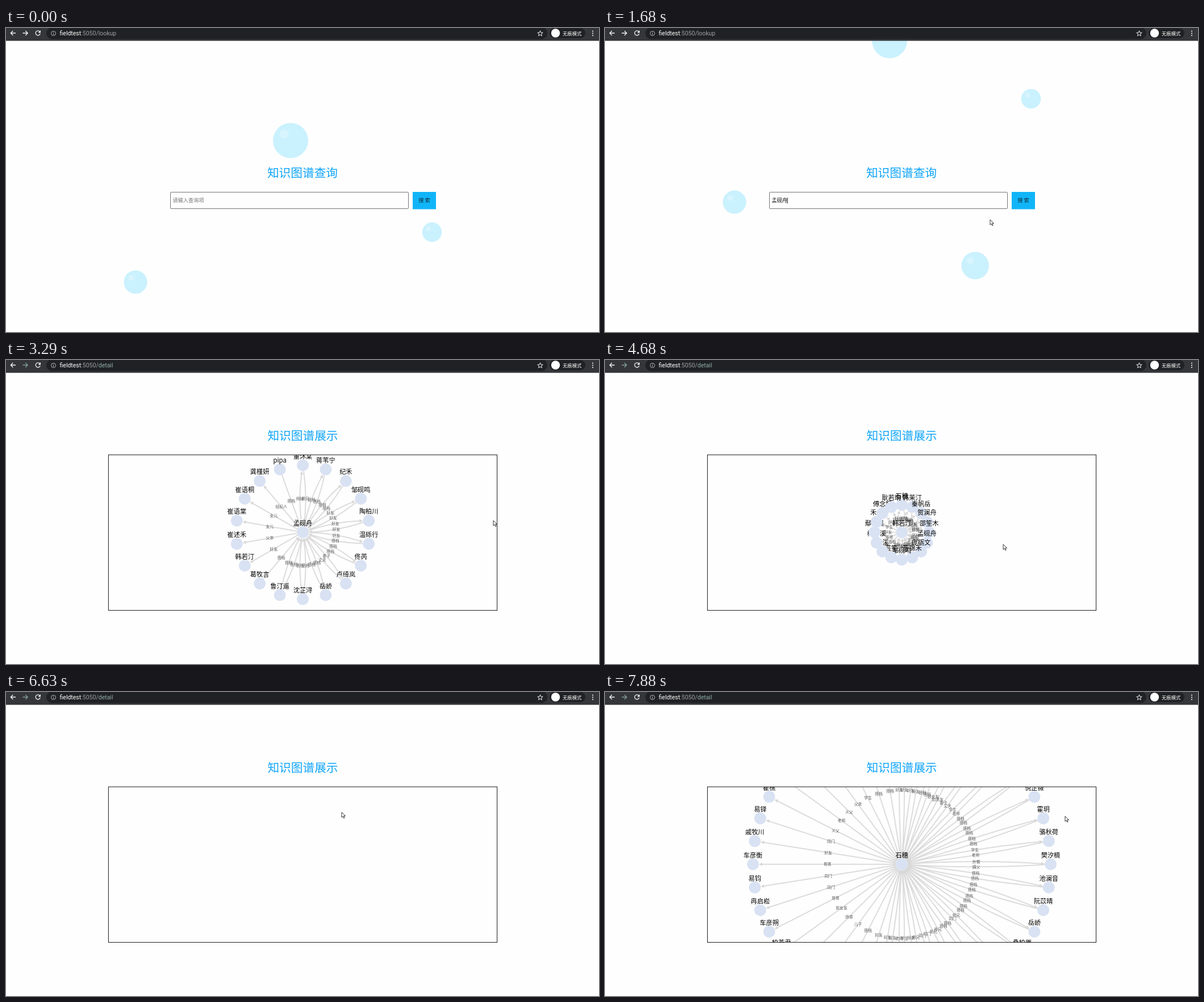
An HTML page that plays this animation: 1044x536 px, repeating every 8000 ms.

```html
<!DOCTYPE html>
<html lang="zh-CN">
<head>
<meta charset="utf-8">
<title>知识图谱</title>
<style>
  html, body { margin: 0; width: 100%; height: 100%; overflow: hidden; background: #fefefe; }
  svg { display: block; width: 1044px; height: 536px; font-family: "Noto Sans CJK SC", "Noto Sans CJK", sans-serif; }
  .title { font-size: 20.7px; font-weight: 350; fill: #10a5fa; text-anchor: middle; }
  .field { font-size: 9.2px; }
  .name { font-size: 11.2px; text-anchor: middle; }
  .relation { font-size: 6.8px; fill: #555; text-anchor: middle; }
  .url { font: 10.5px Roboto, sans-serif; }
  .icon { fill: none; stroke: #f1f3f4; stroke-width: 1.3; }
</style>
</head>
<body>
<svg viewBox="0 0 1044 536">
  <defs><clipPath id="frame"><rect x="181" y="167.5" width="683" height="273.5"/></clipPath></defs>

  <g id="searchPage">
    <g id="bubbles"></g>
    <text class="title" x="522" y="263">知识图谱查询</text>
    <rect x="289.5" y="289.5" width="419" height="29" rx="1.5" fill="#fefefe" stroke="#767676"/>
    <text id="query" class="field" x="293.5" y="307.2"></text>
    <rect id="caret" x="320.5" y="299" width="1" height="10.5"/>
    <rect x="716" y="289" width="41" height="30.5" fill="#10b5f8"/>
    <text class="field" x="736.5" y="307.4" text-anchor="middle" fill="#102a38">搜 索</text>
  </g>

  <g id="resultPage">
    <text class="title" x="522.5" y="141">知识图谱展示</text>
    <g id="graphs" clip-path="url(#frame)"></g>
    <rect x="180.4" y="167.2" width="684.2" height="274.2" fill="none" stroke="#1a1a1a"/>
  </g>

  <g id="toolbar">
    <rect width="1044" height="22.6" fill="#35363a"/>
    <rect x="71" y="-1" width="882" height="20.5" rx="10" fill="#202124"/>
    <rect x="957" y="0" width="63" height="18" rx="9" fill="#202124"/>
    <path class="icon" d="M17 9H8.5M12.3 5L8.3 9L12.3 13"/>
    <path class="icon" id="forward" d="M29.5 9H38M34.2 5L38.2 9L34.2 13"/>
    <path class="icon" d="M59.4 6.2A4.1 4.1 0 1 0 60.2 10.2"/>
    <path d="M61 4V8.4H56.6Z" fill="#f1f3f4"/>
    <circle class="icon" cx="83.5" cy="9.5" r="4" style="stroke:#b4b8bc;stroke-width:1"/>
    <path d="M83.5 7V8M83.5 9V12" stroke="#b4b8bc"/>
    <text class="url" x="94.5" y="13"><tspan fill="#fff">fieldtest</tspan><tspan fill="#9aa0a6">:5050/</tspan><tspan id="route"></tspan></text>
    <path class="icon" id="star" style="stroke-width:1"/>
    <circle cx="967.5" cy="9" r="7.7" fill="#fff"/>
    <text x="980" y="12.6" font-size="8.4" fill="#fff">无痕模式</text>
    <g fill="#f1f3f4">
      <circle cx="1033" cy="5.5" r="1.1"/><circle cx="1033" cy="9.3" r="1.1"/><circle cx="1033" cy="13.1" r="1.1"/>
    </g>
  </g>

  <path id="cursor" d="M0 0V9.1L2.1 7.2L3.6 10.5L5.1 9.8L3.7 6.6H6.5Z" fill="#fff" stroke="#222" stroke-width=".9"/>
</svg>

<script>
const LOOP = 8000, RESULT_AT = 2100, TYPED_AT = 900;
const CX = 522.5, CY = 303.7, NODE_R = 10.5, GROW = 620, BEND = 8.3;

const $ = id => document.getElementById(id);
const show = (node, on) => node.setAttribute('display', on ? 'inline' : 'none');
const set = (node, attrs) => { for (const k in attrs) node.setAttribute(k, attrs[k]); };

function el(parent, tag, attrs, text) {
  const node = document.createElementNS('http://www.w3.org/2000/svg', tag);
  set(node, attrs);
  if (text) node.textContent = text;
  return parent.appendChild(node);
}

// x, y at time 0, radius, rise in px per ms
const bubbles = [
  [501, 198.5, 31, .1048], [750, 360, 17.3, .1399], [228, 448, 20.6, .0839], [651.7, 620.6, 24.2, .12]
].map(([x, y, r, speed]) => {
  const group = el($('bubbles'), 'g', {});
  el(group, 'circle', { r, fill: '#caf1fe' });
  el(group, 'circle', { cx: -r * .36, cy: -r * .36, r: r * .26, fill: '#d8f4fe' });
  return t => set(group, { transform: `translate(${x} ${y - speed * t})` });
});

// Nodes run clockwise from the top: "name:outgoing/second"; "<" marks an edge towards the centre.
const GRAPHS = [
  { start: 2450, end: 4210, radius: 118, centre: '孟砚舟', nodes:
    '董沐棠:师妹/<师兄 蒋苇宁:搭档/<搭档 纪禾:搭档/<搭档 邹砚鸣:好友/<好友 陶柏川:好友/<好友 温砾行:好友/<搭档 ' +
    '佟芮:搭档/<搭档 卢绮岚:妻子/<丈夫 岳峤:<搭档/<搭档 沈芷浔:<搭档/<搭档 鲁汀遥:<搭档/<搭档 葛牧言:<搭档 ' +
    '韩若汀:好友 崔述禾:父亲 崔语棠:女儿 崔语桐:女儿 龚槿妍:经纪人 pipa:<搭档' },
  { start: 4400, end: 6160, radius: 106, centre: '韩若汀', nodes:
    '石穗:好友/<好友 韩茉汀:姐姐/<妹妹 秦帆岳:搭档/<搭档 贺澜舟:好友/<好友 邵笙木:搭档/<搭档 孟砚舟:<好友 ' +
    '庞砺文:前男友/<前女友 苗锦禾:母亲/<女儿 邹砚鸣:搭档/<搭档 芸笙:<主演 乔溪:搭档 柯亦溪:哥哥 鄢柏昊:好友 ' +
    '禾雀:学生 傅念桐:好友 耿若璃:好友' },
  { start: 6790, end: LOOP, radius: 262, centre: '石穗', nodes:
    '韩若汀:好友/<好友 邹砚鸣:好友/<好友 蓝芷汐:搭档/<搭档 柏苓月:前女友/<前男友 于槿禾:妻子/<丈夫 杭牧之:学生/<老师 ' +
    '祁若岚:搭档/<搭档 倪芷薇:搭档/<搭档 霍玥:搭档/<搭档 骆秋荷:学生/<老师 樊汐楠:外甥/<姨父 池澜音:搭档/<搭档 ' +
    '阮苡晴:搭档/<搭档 岳峤:搭档/<搭档 桑柏原:搭档/<搭档 易铮:师兄/<同门 温砾行:搭档/<搭档 洪砚山:师兄/<师兄 ' +
    '易钊:同门/<同门 易钺:师兄/<师弟 全樵生:学生/<老师 陶柏川:好友/<好友 鄢柏昊:好友 纪禾:搭档 车予安:儿子 ' +
    '易锴:师弟 柏苓君:前女友 车彦朔:哥哥 冉启崧:同门 易钧:同门 车彦衡:哥哥 戚牧川:好友 易铎:同门 瞿樵:义父 ' +
    '于占樵:老师 常牧野:义父 车岱山:父亲 邵予舟:学生 佟芮:搭档 陆苇杭:搭档' }
];

function makeGraph({ start, end, radius, centre, nodes }) {
  const root = el($('graphs'), 'g', {});
  const lines = el(root, 'path', { fill: 'none', stroke: '#dcdcdc', 'stroke-width': 2 });
  const arrows = el(root, 'path', { fill: '#d8d8d8' });
  const labels = el(root, 'g', {});
  const discs = el(root, 'g', {});

  const addNode = name => {
    const node = el(discs, 'g', {});
    el(node, 'circle', { r: NODE_R, fill: '#d9e2f3' });
    el(node, 'text', { class: 'name', y: -12 }, name);
    return node;
  };
  set(addNode(centre), { transform: `translate(${CX} ${CY})` });

  const list = nodes.split(' ').map((spec, i, all) => {
    const [name, relations] = spec.split(':');
    const edges = relations.split('/').map((text, k, both) => ({
      inward: text[0] === '<',
      side: both.length < 2 ? 0 : k ? -1 : 1,
      label: el(labels, 'text', { class: 'relation' }, text.replace('<', ''))
    }));
    const angle = (i / all.length - .25) * 2 * Math.PI;
    return { cos: Math.cos(angle), sin: Math.sin(angle), edges, disc: addNode(name) };
  });

  const towards = (x, y, qx, qy, d) => {
    const len = Math.hypot(qx - x, qy - y) || 1;
    return [x + (qx - x) / len * d, y + (qy - y) / len * d];
  };

  return t => {
    const visible = t >= start && t < end;
    show(root, visible);
    if (!visible) return;
    const r = Math.max(1, radius * Math.min(1, (t - start) / GROW));
    let linePath = '', arrowPath = '';
    for (const { cos, sin, edges, disc } of list) {
      const x = CX + r * cos, y = CY + r * sin;
      set(disc, { transform: `translate(${x} ${y})` });
      for (const { inward, side, label } of edges) {
        const qx = (CX + x) / 2 + sin * BEND * side, qy = (CY + y) / 2 - cos * BEND * side;
        let from = towards(CX, CY, qx, qy, NODE_R), tip = towards(x, y, qx, qy, NODE_R);
        if (inward) [from, tip] = [tip, from];
        const base = towards(...tip, qx, qy, 6);
        const nx = (tip[1] - base[1]) / 2, ny = (base[0] - tip[0]) / 2;
        linePath += `M${from}Q${qx} ${qy} ${base}`;
        arrowPath += `M${tip}L${base[0] + nx} ${base[1] + ny}L${base[0] - nx} ${base[1] - ny}Z`;
        set(label, { x: (from[0] + 2 * qx + tip[0]) / 4, y: (from[1] + 2 * qy + tip[1]) / 4 + 2.5 });
      }
    }
    set(lines, { d: linePath });
    set(arrows, { d: arrowPath });
  };
}
const graphs = GRAPHS.map(makeGraph);

// time, x, y
const POINTER = [
  [1450, 655, 330], [1680, 678, 338], [1950, 735, 305], [2100, 735, 305], [2600, 858, 283], [3300, 858, 283],
  [4040, 417, 368], [4180, 417, 368], [4650, 701, 325], [5060, 705, 325], [5840, 533, 246], [5900, 533, 246],
  [6010, 526, 197], [6120, 526, 197], [6390, 591, 212], [6700, 591, 212], [7350, 766, 216], [7860, 810, 219], [LOOP, 810, 219]
];

function movePointer(t) {
  const next = POINTER.findIndex(p => p[0] > t);
  show($('cursor'), next > 0);
  if (next < 1) return;
  const [t0, x0, y0] = POINTER[next - 1], [t1, x1, y1] = POINTER[next];
  const u = (t - t0) / (t1 - t0), e = u * u * (3 - 2 * u);
  set($('cursor'), { transform: `translate(${x0 + (x1 - x0) * e} ${y0 + (y1 - y0) * e})` });
}

const starPoints = Array.from({ length: 10 }, (_, i) => {
  const a = (i / 5 - .5) * Math.PI, r = i % 2 ? 2.1 : 5;
  return [940.5 + r * Math.cos(a), 9.8 + r * Math.sin(a)];
});
set($('star'), { d: `M${starPoints.join('L')}Z` });

function render(t) {
  const onResult = t >= RESULT_AT, typed = t >= TYPED_AT;
  show($('searchPage'), !onResult);
  show($('resultPage'), onResult);
  show($('caret'), typed);
  $('query').textContent = typed ? '孟砚舟' : '请输入查询项';
  set($('query'), { fill: typed ? '#111' : '#757575' });
  $('route').textContent = onResult ? 'detail' : 'lookup';
  set($('route'), { fill: onResult ? '#8fada4' : '#9aa0a6' });
  $('forward').style.stroke = onResult ? '#7f9f94' : '#f1f3f4';
  bubbles.forEach(move => move(t));
  graphs.forEach(draw => draw(t));
  movePointer(t);
}

const began = performance.now();
function tick() {
  render((performance.now() - began) % LOOP);
  requestAnimationFrame(tick);
}
tick();
</script>
</body>
</html>
```
